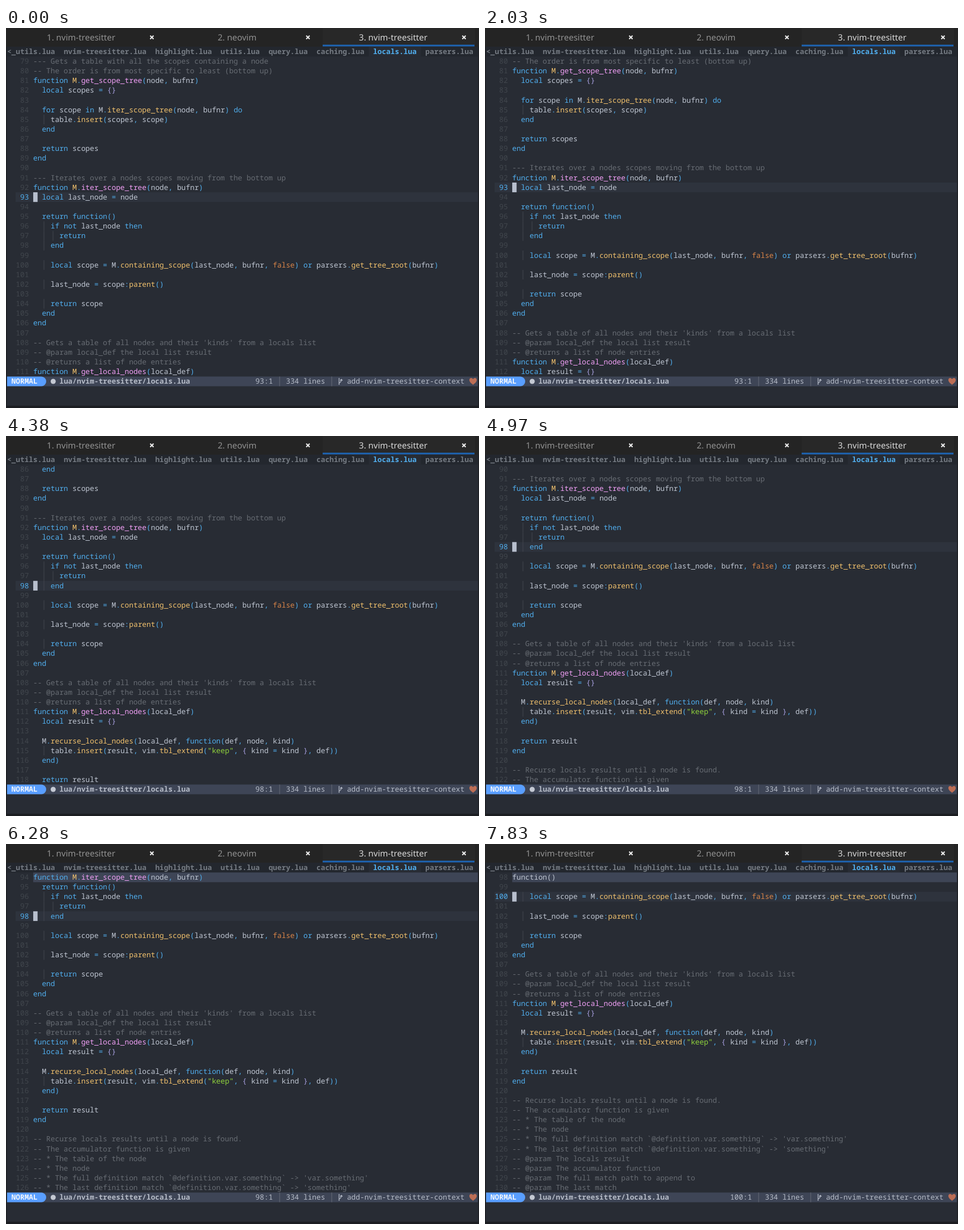
Recreate the animation shown at these times as an HTML page. Size 835 by 671 pixels, loop 8 s.

```html
<!DOCTYPE html>
<html lang="en">
<head>
<meta charset="utf-8">
<title>Scrolling with code context</title>
<style>
  html, body { margin: 0; width: 100%; height: 100%; overflow: hidden; background: #282c34; }
  svg { display: block; width: 835px; height: 671px; }
  text { white-space: pre; text-rendering: geometricPrecision; }
  .mono { font: 12.82px "Noto Sans Mono", "DejaVu Sans Mono", monospace; }
  .bold { font-weight: 700; }
  .tab { font: 15px "Noto Sans", "Open Sans", sans-serif; text-anchor: middle; }
</style>
</head>
<body>
<svg id="stage" viewBox="0 0 835 671"></svg>
<script>
const LOOP = 8000;
const CW = 7.692, RH = 17.125;         // character cell
const LEFT = 1.9, CODE = LEFT + 6 * CW, TOP = 50.3, BASE = 12.7;
const ROWS = 33, FIRST = 79;

const C = {
  bg: '#282c34', fg: '#c0c7d3', key: '#51afef', call: '#f2c26d', def: '#f2a0f7',
  brace: '#a9a1e1', str: '#91d43c', bool: '#da8548', note: '#686d74',
  num: '#41464d', guide: '#42474f', line: '#2e333d', bar: '#3e4556', status: '#b6bcc8'
};

const source = `--- Gets a table with all the scopes containing a node
-- The order is from most specific to least (bottom up)
function M.get_scope_tree(node, bufnr)
  local scopes = {}

  for scope in M.iter_scope_tree(node, bufnr) do
    table.insert(scopes, scope)
  end

  return scopes
end

--- Iterates over a nodes scopes moving from the bottom up
function M.iter_scope_tree(node, bufnr)
  local last_node = node

  return function()
    if not last_node then
      return
    end

    local scope = M.containing_scope(last_node, bufnr, false) or parsers.get_tree_root(bufnr)

    last_node = scope:parent()

    return scope
  end
end

-- Gets a table of all nodes and their 'kinds' from a locals list
-- @param local_def the local list result
-- @returns a list of node entries
function M.get_local_nodes(local_def)
  local result = {}

  M.recurse_local_nodes(local_def, function(def, node, kind)
    table.insert(result, vim.tbl_extend("keep", { kind = kind }, def))
  end)

  return result
end

-- Recurse locals results until a node is found.
-- The accumulator function is given
-- * The table of the node
-- * The node
-- * The full definition match \`@definition.var.something\` -> 'var.something'
-- * The last definition match \`@definition.var.something\` -> 'something'
-- @param The locals result
-- @param The accumulator function
-- @param The full match path to append to
-- @param The last match`.split('\n');

// j / k move the cursor, e scrolls one line
const keys = [
  [500, 'j'], [1140, 'k'], [2030, 'e'], [2270, 'e'], [2440, 'e'],
  [2750, 'j'], [2910, 'j'], [3050, 'j'], [3200, 'j'], [3320, 'j'],
  [3730, 'e'], [4020, 'e'], [4200, 'e'], [4380, 'e'], [4510, 'e'], [4660, 'e'],
  [4820, 'e'], [4970, 'e'], [5140, 'e'], [5500, 'e'], [5960, 'e'], [6280, 'e'],
  [6550, 'e'], [6840, 'e'], [7490, 'je'], [7830, 'je']
];

const esc = s => s.replace(/&/g, '&amp;').replace(/</g, '&lt;');
const rect = (x, y, w, h, fill) => `<rect x="${x}" y="${y}" width="${w}" height="${h}" fill="${fill}"/>`;
const text = (x, y, s, fill, cls = 'mono') => `<text x="${x}" y="${y}" fill="${fill}" class="${cls}">${esc(s)}</text>`;
const path = (d, stroke, w) => `<path d="${d}" fill="none" stroke="${stroke}" stroke-width="${w}"/>`;
const col = n => LEFT + n * CW;
const rowY = i => TOP + i * RH;

const KEYWORD = /^(function|local|for|in|do|end|return|if|not|then|or)$/;

function tokens(line) {
  if (line.startsWith('--')) return [[0, line, C.note]];
  const isDef = line.startsWith('function M.');
  return [...line.matchAll(/"[^"]*"|\w+|[^\s\w]/g)].map(({ 0: s, index }) => {
    let color = C.fg;
    if (s[0] === '"') color = C.str;
    else if (KEYWORD.test(s)) color = C.key;
    else if (s === 'false') color = C.bool;
    else if (/[{}]/.test(s)) color = C.brace;
    else if (/\W/.test(s)) color = C.key;
    else if (line[index + s.length] === '(') color = isDef ? C.def : C.call;
    else if (isDef && s === 'M') color = C.call;
    return [index, s, color];
  });
}

function codeLine(line, y) {
  return tokens(line).map(([at, s, color]) => text(CODE + at * CW, y + BASE, s, color)).join('');
}

function guides(line, y) {
  const indent = line.search(/\S/);
  let out = '';
  for (let c = 2; c < indent; c += 2) out += rect(Math.round(CODE + (c + 0.5) * CW) - 0.5, y, 1, RH, C.guide);
  return out;
}

function context(top) {
  if (top < 93) return '';
  const bar = rect(CODE, TOP, 833 - CODE, RH, C.bar);
  return bar + (top > 95 ? text(CODE, TOP + BASE, 'function()', C.fg) : codeLine(source[92 - FIRST], TOP));
}

function editor(top, cursor) {
  const cy = rowY(cursor - top);
  let out = rect(17, cy, 816, RH, C.line);
  for (let i = 0; i < ROWS; i++) {
    const n = top + i, y = rowY(i), line = source[n - FIRST];
    const label = String(n);
    out += text(col(5 - label.length), y + BASE, label, n === cursor ? C.key : C.num);
    if (i || top < 93) out += guides(line, y) + codeLine(line, y);
  }
  out += context(top) + rect(CODE, cy, CW, RH, '#b8bfcd');
  const pos = cursor + ':1';
  return out + text(col(61 - pos.length), rowY(ROWS) + BASE, pos, C.status);
}

function windowTabs() {
  let out = rect(0, 0, 835, 33.2, '#242424') + rect(559, 0, 269, 33, '#282828') + rect(559, 29.5, 268, 3, '#1d64b4');
  ['1. nvim-treesitter', '2. neovim', '3. nvim-treesitter'].forEach((name, i) => {
    const x = 257.5 + i * 275.5;
    out += text(x - 125, 22, name, i === 2 ? '#d8d8d8' : '#929292', 'tab');
    out += path(`M${x - 3} 13.5l6 6m0 -6l-6 6`, '#f0f0f0', 2);
  });
  return out;
}

function bufferTabs() {
  const y = TOP - RH;
  let out = rect(LEFT, y, 831, RH, '#23272e');
  let c = 0;
  for (const name of ['<_utils', 'nvim-treesitter', 'highlight', 'utils', 'query', 'caching', 'locals', 'parsers']) {
    const file = name + '.lua', on = name === 'locals';
    if (on) out += rect(col(c - 1), y, (file.length + 2) * CW, RH, C.bg);
    out += text(col(c), y + BASE, file, on ? C.key : '#757b83', 'mono bold');
    c += file.length + 2;
  }
  return out;
}

function statusBar() {
  const y = rowY(ROWS), base = y + BASE, mid = y + RH / 2;
  const sep = c => rect(Math.round(col(c + 0.5)) - 0.5, y, 1, RH, '#666c79');
  return rect(LEFT, y, 831, RH, C.bar)
    + `<path d="M${LEFT} ${y}H62.5a8.5 ${RH / 2} 0 0 1 0 ${RH}H${LEFT}z" fill="#599eff"/>`
    + text(col(1), base, 'NORMAL', '#f2f6fc', 'mono bold')
    + `<circle cx="83.3" cy="${mid}" r="4.5" fill="#c4c9d3"/>`
    + text(col(12), base, 'lua/nvim-treesitter/locals.lua', C.status, 'mono bold')
    + sep(62) + text(col(64), base, '334 lines', C.status) + sep(74)
    + path(`M588 ${mid - 6}v12m0 -3q4 -2 4 -6m-2 1.5l2 -2l2 2`, C.status, 1.3)
    + text(col(78), base, 'add-nvim-treesitter-context', C.status)
    + `<path d="M824.5 ${mid + 6}c-3 -2.5 -6.5 -5 -6.5 -8.5c0 -4 5 -4.5 6.5 -1.2c1.5 -3.3 6.5 -2.8 6.5 1.2c0 3.5 -3.5 6 -6.5 8.5z" fill="#bd6e55"/>`;
}

const stage = document.getElementById('stage');
stage.innerHTML = rect(0, 0, 835, 671, '#1c1e22') + rect(1.5, 33, 832, 634, C.bg)
  + windowTabs() + bufferTabs() + statusBar() + '<g id="editor"></g>';
const view = document.getElementById('editor');
let shown = '';

function draw(ms) {
  let top = 79, cursor = 93;
  for (const [at, press] of keys) {
    if (at > ms) break;
    for (const k of press) {
      if (k === 'e') top++;
      else cursor += k === 'j' ? 1 : -1;
    }
  }
  const state = top + ':' + cursor;
  if (state === shown) return;
  shown = state;
  view.innerHTML = editor(top, cursor);
}

const start = performance.now();
function tick() {
  draw((performance.now() - start) % LOOP);
  requestAnimationFrame(tick);
}
tick();
</script>
</body>
</html>
```
